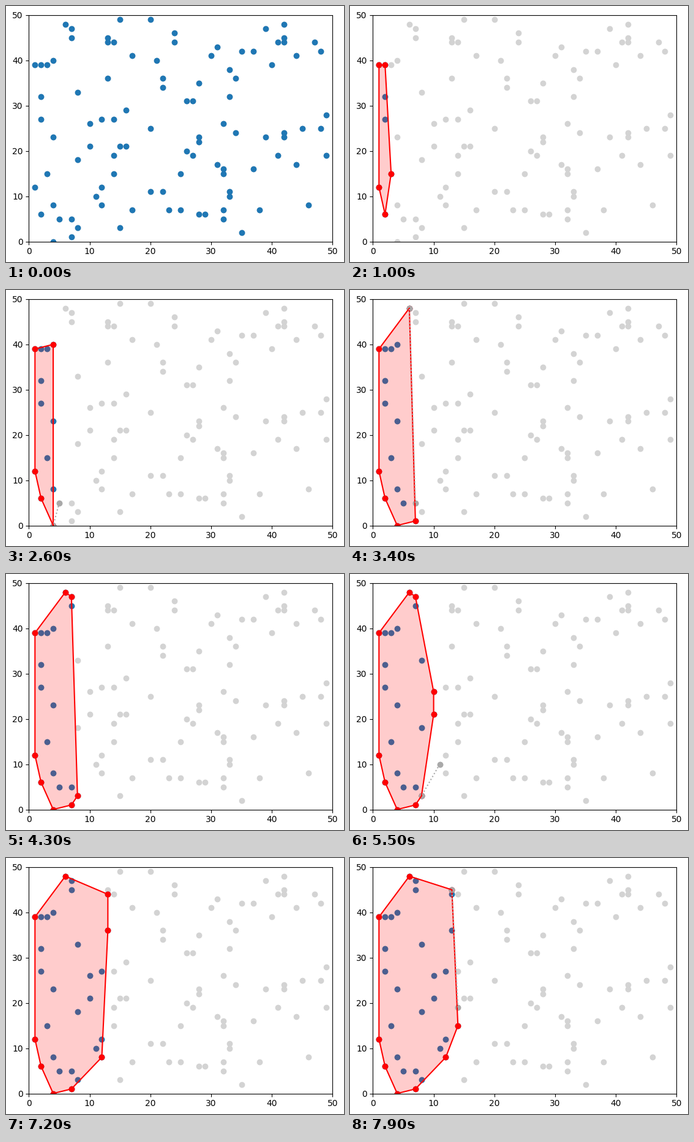
Recreate the animation shown at these times as a matplotlib script. Size 552 px wide and 418 px high, loop 8 s.

```python
import matplotlib.pyplot as plt
from matplotlib.animation import FuncAnimation

W, H, DPI = 552, 418, 100
FRAMES, INTERVAL = 80, 100

# y values of the points in each column x
COLUMNS = {
    1: (12, 39), 2: (6, 27, 32, 39), 3: (15, 39), 4: (0, 8, 23, 40),
    5: (5,), 6: (48,), 7: (1, 5, 45, 47), 8: (3, 18, 33),
    10: (21, 26), 11: (10,), 12: (8, 12, 27), 13: (36, 44, 45),
    14: (15, 19, 27, 44), 15: (3, 21, 49), 16: (21, 29), 17: (7, 41),
    20: (11, 25, 49), 21: (40,), 22: (11, 34, 36), 23: (7,),
    24: (44, 46), 25: (7, 15), 26: (20, 31), 27: (19, 31),
    28: (6, 22, 23, 35), 29: (6,), 30: (41,), 31: (17, 43),
    32: (5, 7, 15, 16, 26), 33: (10, 11, 32, 38), 34: (24, 36),
    35: (2, 42), 37: (16, 42), 38: (7,), 39: (23, 47), 40: (39,),
    41: (19, 44), 42: (23, 24, 44, 45, 48), 44: (17, 41), 45: (25,),
    46: (8,), 47: (44,), 48: (25, 42), 49: (19, 28),
}
POINTS = [(x, y) for x, ys in COLUMNS.items() for y in ys]


def cross(o, a, b):
    return (a[0] - o[0]) * (b[1] - o[1]) - (a[1] - o[1]) * (b[0] - o[0])


def hull_steps(pts):
    """Yield (points done, hull, probe segment) for an incremental hull."""
    a, b, c = pts[:3]
    upper, lower = [a, b, c], [a, c]
    hull = [a, c, b]
    for i, p in enumerate(pts[3:], 3):
        for chain, sign in ((upper, -1), (lower, 1)):
            while len(chain) > 1 and sign * cross(chain[-2], chain[-1], p) <= 0:
                chain.pop()
                yield i, hull, [p, chain[-1]]
            chain.append(p)
        hull = lower + upper[-2:0:-1]
        yield i + 1, hull, []


STEPS = [(len(POINTS), [], [])] + list(hull_steps(POINTS))[:FRAMES - 1]

fig = plt.figure(figsize=(W / DPI, H / DPI), dpi=DPI)
ax = fig.add_axes([37.4 / W, 33.5 / H, 496 / W, 369.6 / H])
ax.set(xlim=(0, 50), ylim=(0, 50))


def dots(color):
    return ax.scatter([], [], color=color)


ax.scatter(*zip(*POINTS), color="lightgray")
done_dots = dots("tab:blue")
area, = ax.fill([0], [0], color="red", alpha=0.2, lw=0)
hull_dots = dots("red")
probe_dots = dots("darkgray")
hull_line, = ax.plot([], [], color="red")
probe_line, = ax.plot([], [], ":", color="darkgray")


def place(artist, pts):
    artist.set_offsets(pts or [(None, None)])


def trace(line, pts):
    line.set_data([x for x, _ in pts], [y for _, y in pts])


def draw(n):
    done, hull, probe = STEPS[n]
    place(done_dots, POINTS[:done])
    place(hull_dots, hull)
    place(probe_dots, probe)
    area.set_visible(bool(hull))
    if hull:
        area.set_xy(hull)
    trace(hull_line, hull + hull[:1])
    trace(probe_line, probe)
    return done_dots, area, hull_dots, probe_dots, hull_line, probe_line


anim = FuncAnimation(fig, draw, frames=FRAMES, interval=INTERVAL,
                     repeat=True, repeat_delay=0)
plt.show()
```
